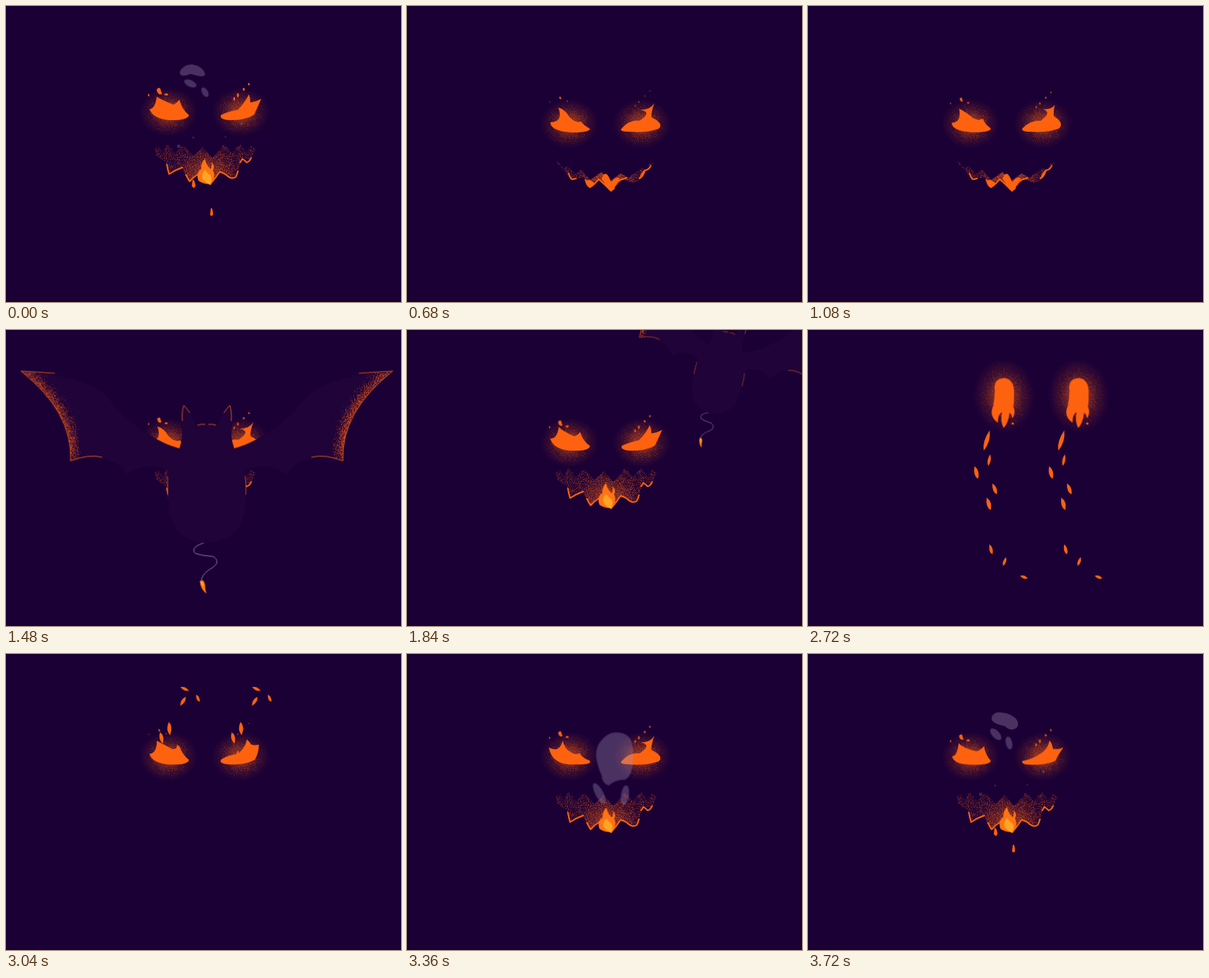
An HTML page without scripts for the animation above (3760 ms loop, 540 by 405 pixels).

```html
<!DOCTYPE html>
<html lang="en">
<head>
<meta charset="utf-8">
<title>Haunted face</title>
<style>
  html, body { margin: 0; width: 100%; height: 100%; overflow: hidden; background: #1b0036; }
  svg { display: block; width: 100vw; height: 100vh; }
  .a { animation: 3.76s linear infinite; }
  .fire { fill: #ff620f; }
  .line { fill: none; stroke: #ff620f; stroke-linecap: round; stroke-linejoin: round; }
  .grain { filter: url(#grain); }
  .smoke { fill: #a48fb8; fill-opacity: .34; }

  /* Eyes */
  .eyes { animation-name: eyes; transform-origin: 272px 150px; }
  @keyframes eyes {
    0% { transform: translateY(5px); }
    12% { transform: translateY(9px); }
    17%, 30% { transform: translateY(21px); }
    39.4%, 50% { transform: translateY(14px); }
    53%, 77% { transform: translateY(0) scaleY(0); }
    79%, 98.9% { transform: none; }
    100% { transform: translateY(5px); }
  }
  .left { animation-name: left; }
  @keyframes left {
    0%, 12%, 22%, 33%, 50%, 80%, 94%, 100% { d: path("M196 136Q204 136 206 119Q214 124 229 130Q234 127 237 123Q240 136 250 144Q249 152 222 151Q201 149 196 136Z"); }
    3%, 30%, 42%, 98.9% { d: path("M197 140Q204 140 206 122Q212 129 230 133Q236 132 241 126Q242 137 250 146Q248 152 220 151Q199 150 197 140Z"); }
    6%, 18.1%, 28%, 39.4%, 84% { d: path("M196 138Q214 138 207 118Q216 120 222 131Q231 140 238 137Q240 141 250 147Q250 152 225 152Q196 150 196 138Z"); }
    9%, 15%, 25%, 36%, 45%, 89.4% { d: path("M194 128Q209 136 213 118Q216 133 230 137Q236 137 236 135Q238 142 250 146Q253 152 230 151Q198 153 194 128Z"); }
  }
  .right { animation-name: right; }
  @keyframes right {
    0%, 12%, 22%, 33%, 50%, 80%, 94%, 100% { d: path("M294 144Q304 139 317 137Q326 128 332 116Q334 120 334 127Q342 126 349 122Q344 133 339 144Q325 152 305 151Q291 150 294 144Z"); }
    3%, 9%, 25%, 42%, 98.9% { d: path("M293 146Q305 145 318 136Q328 130 330 118Q334 122 335 130Q342 131 349 128Q342 137 338 146Q325 152 300 151Q291 150 293 146Z"); }
    6%, 18.1%, 28%, 39.4%, 84%, 89.4% { d: path("M293 147Q304 134 318 136Q336 124 319 121Q333 121 338 112Q334 124 334 131Q352 140 344 147Q325 153 305 151Q290 151 293 147Z"); }
  }
  .spark { animation: spark .47s linear infinite; transform-box: fill-box; transform-origin: center; }
  @keyframes spark {
    0%, 100% { transform: none; }
    60% { transform: translateY(-9px) scale(.2); }
    61% { transform: translateY(9px) scale(.2); }
  }

  /* Mouth */
  .mouth { animation-name: mouth; }
  @keyframes mouth { 0%, 50.5% { opacity: 1; } 53%, 81.5% { opacity: 0; } 84.5%, 100% { opacity: 1; } }
  .maw { animation-name: maw; }
  @keyframes maw {
    0%, 12.5%, 34.5%, 100% { d: path("M203 195L209 192 214 199 221 189 231 201 242 190 256 205 269 193 282 208 298 189 309 201 320 189 328 199 335 192 341 195 335 211 322 210 318 224 311 236 293 227 279 244 263 229 250 240 240 221 223 229 218 214 205 204Z"); }
    16.5%, 30.5% { d: path("M203 211L208 215 214 222 220 219 229 229 239 224 250 238 266 227 277 240 292 229 303 235 319 222 327 223 332 215 339 213 330 225 321 231 317 239 309 242 295 237 279 253 263 237 250 249 241 235 224 237 216 227 207 217Z"); }
  }
  .lip { animation-name: lip; }
  @keyframes lip {
    0%, 12.5%, 34.5%, 100% { d: path("M220 217Q221 224 223 230Q232 224 241 221M246 231Q249 237 251 240Q256 234 263 230Q271 236 279 244Q286 236 292 227Q297 228 301 231Q308 238 314 234Q316 231 317 226M320 214Q322 212 323 209Q326 211 329 214Q333 213 335 208"); }
    16.5%, 30.5% { d: path("M221 229Q222 234 225 237Q228 237 231 236M244 238Q246 246 250 248Q256 245 262 237Q268 242 279 253Q284 246 288 240Q292 237 295 237Q297 236 298 236Q299 235 300 235M318 236Q320 233 321 230Q324 226 325 225Q331 224 333 219"); }
  }
  .open { animation-name: open; }
  @keyframes open { 0%, 12.5%, 34.5%, 100% { opacity: 1; } 15%, 31% { opacity: 0; } }
  .shut { animation-name: shut; }
  @keyframes shut { 0%, 14%, 33%, 100% { opacity: 0; } 16.5%, 30.5% { opacity: 1; } }
  .lick { animation: lick .47s ease-in-out infinite; transform-origin: 277px 243px; }
  @keyframes lick { 50% { transform: skewX(-7deg) scaleY(.82); } }

  .drip1 { animation-name: drip1; }
  @keyframes drip1 {
    0% { transform: translate(281px, 281px); }
    4.2%, 19% { transform: translate(281px, 371px); visibility: hidden; }
    20% { transform: translate(279px, 252px); visibility: visible; }
    23% { transform: translate(279px, 272px); }
    27.7% { transform: translate(279px, 371px); visibility: visible; }
    27.8%, 94.6% { transform: translate(281px, 244px); visibility: hidden; }
    94.7% { transform: translate(281px, 244px); visibility: visible; }
    98.9% { transform: translate(281px, 265px); }
    100% { transform: translate(281px, 281px); visibility: visible; }
  }
  .drip2 { animation-name: drip2; }
  @keyframes drip2 {
    0%, 5% { transform: translate(256px, 243px); }
    8% { transform: translate(256px, 270px); }
    12.8% { transform: translate(256px, 371px); visibility: visible; }
    12.9%, 95% { transform: translate(256px, 238px) scale(0); visibility: hidden; }
    98% { transform: translate(256px, 243px); visibility: visible; }
    100% { transform: translate(256px, 243px); }
  }

  /* Smoke */
  .puff { animation-name: puff; transform-origin: 278px 215px; }
  @keyframes puff {
    0% { transform: none; opacity: 1; }
    7% { transform: translate(-6px, -12px); opacity: 0; }
    83.9% { transform: scale(.1); opacity: 0; }
    84% { transform: scale(.1); opacity: 1; }
    89.4%, 100% { transform: none; opacity: 1; }
  }
  .cloud { animation-name: cloud; }
  @keyframes cloud {
    0%, 8%, 100% { d: path("M255 80Q268 82 272 92Q273 97 264 96Q256 94 252 93Q246 96 240 95Q235 92 240 86Q246 79 255 80Z"); }
    80%, 89.4% { d: path("M286 107Q309 107 309 132Q311 166 298 172Q284 172 276 180Q267 178 266 166Q252 135 264 120Q273 107 286 107Z"); }
    98.9% { d: path("M264 80Q280 81 287 91Q291 102 280 104Q274 103 270 99Q262 97 258 95Q249 91 253 84Q257 79 264 80Z"); }
  }
  .wisp1 { animation-name: wisp1; }
  @keyframes wisp1 {
    0%, 8%, 100% { transform: translate(252px, 106px) rotate(-65deg) scale(.9); }
    80%, 89.4% { transform: translate(263px, 191px) rotate(-28deg) scale(1.1, 1.6); }
    98.9% { transform: translate(257px, 110px) rotate(-42deg); }
  }
  .wisp2 { animation-name: wisp2; }
  @keyframes wisp2 {
    0%, 8%, 100% { transform: translate(272px, 118px) rotate(-30deg) scale(.8); }
    80%, 89.4% { transform: translate(298px, 193px) rotate(8deg) scale(1.1, 1.5); }
    98.9% { transform: translate(275px, 122px) rotate(-12deg) scale(.9, 1); }
  }
  .bits { animation-name: bits; }
  @keyframes bits { 0%, 100% { opacity: .8; } 5%, 92% { opacity: 0; } }

  /* Bat */
  .bat { animation-name: bat; transform-origin: 275px 215px; }
  @keyframes bat {
    0%, 33% { transform: scale(.02); visibility: hidden; }
    33.1% { transform: scale(.1); visibility: visible; }
    39.4% { transform: none; }
    42% { transform: translateY(14px) scale(.95, 1.04); }
    45.7% { transform: translateY(-10px) scale(.78, .9); }
    53% { transform: translate(340px, -330px) rotate(30deg) scale(.45); visibility: visible; }
    53.1%, 100% { transform: scale(.02); visibility: hidden; }
  }

  /* Fireballs: --d is how many ms a part lags behind the head */
  .ride {
    animation: ride 3.76s linear infinite;
    animation-delay: calc(var(--d, 0) * 1ms - 3760ms);
    offset-path: path("M560 -10C520 100 480 190 432 250S370 352 310 342S243 270 243 200S262 125 267 92S235 -8 222 140");
    offset-rotate: auto 90deg;
  }
  @keyframes ride {
    0%, 54.2% { offset-distance: 0px; visibility: hidden; }
    54.3% { offset-distance: 0px; visibility: visible; }
    59.57% { offset-distance: 284px; }
    72.34% { offset-distance: 750px; }
    78.6% { offset-distance: 905px; visibility: visible; }
    78.7%, 100% { offset-distance: 905px; visibility: hidden; }
  }
  .stretch { animation-name: stretch; }
  @keyframes stretch { 0%, 59.57% { transform: scaleY(1.42); } 72.34%, 100% { transform: none; } }
  .apart { animation-name: apart; }
  @keyframes apart {
    0%, 59.57% { transform: translateX(54px); }
    72.34% { transform: translateX(102px); }
    78.7%, 100% { transform: translateX(98px); }
  }
  .ash { animation-name: ash; transform-origin: 225px 140px; }
  @keyframes ash {
    0%, 51.5% { opacity: 0; transform: translateY(12px) scale(.8); }
    53% { opacity: 1; }
    59.57% { opacity: 1; transform: none; }
    64%, 100% { opacity: 0; transform: translateY(-8px) scale(1.05); }
  }
</style>
</head>
<body>
<svg viewBox="0 0 540 405" preserveAspectRatio="none">
  <defs>
    <filter id="grain" x="-20%" y="-20%" width="140%" height="140%" color-interpolation-filters="sRGB">
      <feTurbulence type="fractalNoise" baseFrequency=".93" numOctaves="2" seed="4"/>
      <feColorMatrix values="0 0 0 0 0  0 0 0 0 0  0 0 0 0 0  2.4 0 0 0 -.7"/>
      <feComposite in2="SourceGraphic" operator="arithmetic" k2="1" k3="1" k4="-1"/>
      <feComponentTransfer result="dots"><feFuncA type="linear" slope="2.5"/></feComponentTransfer>
      <feFlood flood-color="#ff620f"/>
      <feComposite in2="dots" operator="in"/>
    </filter>
    <filter id="soft" x="-50%" y="-50%" width="200%" height="200%"><feGaussianBlur stdDeviation="8"/></filter>
    <radialGradient id="glow">
      <stop offset=".2" stop-color="#ff620f" stop-opacity=".42"/>
      <stop offset=".6" stop-color="#ff620f" stop-opacity=".14"/>
      <stop offset="1" stop-color="#ff620f" stop-opacity="0"/>
    </radialGradient>
    <radialGradient id="dust">
      <stop offset=".4" stop-color="#ff620f" stop-opacity=".65"/>
      <stop offset="1" stop-color="#ff620f" stop-opacity="0"/>
    </radialGradient>
    <radialGradient id="heat" gradientUnits="userSpaceOnUse" cx="277" cy="238" r="80">
      <stop offset="0" stop-color="#ff620f" stop-opacity=".7"/>
      <stop offset=".5" stop-color="#ff620f" stop-opacity=".45"/>
      <stop offset="1" stop-color="#ff620f" stop-opacity=".36"/>
    </radialGradient>
    <radialGradient id="warm" gradientUnits="userSpaceOnUse" cx="275" cy="235" r="42">
      <stop offset="0" stop-color="#ff620f" stop-opacity=".5"/>
      <stop offset="1" stop-color="#ff620f" stop-opacity=".06"/>
    </radialGradient>
    <path id="half" d="M276 129Q267 127 260 131Q255 114 243 103Q239 120 240 132Q243 145 237 162C195 150 155 115 140 92C110 63 60 60 20 56Q91 112 88 179Q145 165 165 198Q190 180 221 192V235Q223 290 276 292Z"/>
    <clipPath id="wing"><use href="#half"/></clipPath>
    <g id="side">
      <use href="#half" fill="#1f0339"/>
      <g clip-path="url(#wing)">
        <g class="grain" opacity=".7"><path d="M20 56Q91 112 88 179" fill="none" stroke="#fff" stroke-width="20" filter="url(#soft)"/></g>
      </g>
      <path class="line" stroke-width="1" d="M66 59Q40 57 20 56Q91 112 88 179Q114 169 131 174M241 124Q240 112 243 103Q248 108 251 113M262 130Q268 128 272 129" opacity=".85"/>
    </g>
    <g id="halo">
      <ellipse rx="40" ry="34" fill="url(#glow)"/>
      <ellipse rx="38" ry="33" fill="url(#dust)" class="grain" opacity=".3"/>
    </g>
    <path id="ember" class="fire" d="M1 -9Q6 0 -1 9Q-6 2 1 -9Z"/>
    <use id="e1" href="#ember" transform="translate(-3) scale(1 1.6)"/>
    <use id="e2" href="#ember" transform="translate(4) scale(.7 .9)"/>
    <use id="e3" href="#ember" transform="translate(-13) rotate(-22)"/>
    <use id="e4" href="#ember" transform="translate(12) rotate(-28) scale(.9)"/>
    <use id="e5" href="#ember" transform="translate(3) rotate(-20)"/>
    <use id="e6" href="#ember" transform="translate(-6) scale(.8)"/>
    <use id="e7" href="#ember" transform="translate(2) rotate(50) scale(.7)"/>
    <use id="e8" href="#ember" transform="rotate(-10) scale(.7 .6)"/>
    <g id="ball">
      <use href="#halo" transform="translate(0 10) scale(1.05 1.5)"/>
      <path class="fire" d="M-12 2Q-13 -14 2 -14Q15 -12 14 6Q13 18 11 26Q14 36 8 42Q8 36 5 34Q2 48 -5 54Q-9 44 -5 32Q-11 34 -12 46Q-24 36 -16 22Q-13 12 -12 2Z"/>
      <circle class="fire" cx="8" cy="49" r="1.6"/>
    </g>
  </defs>

  <rect width="540" height="405" fill="#1b0036"/>

  <g class="a eyes">
    <use href="#halo" x="222" y="140"/>
    <use href="#halo" x="321" y="140"/>
    <path class="a fire left"/>
    <path class="a fire right"/>
    <g class="fire">
      <path class="spark" d="M206 109Q211 104 212 112Q215 116 210 116Q206 114 206 109Z"/>
      <ellipse class="spark" cx="195" cy="117" rx="1" ry="1.8"/>
      <ellipse class="spark" cx="219" cy="116" rx="2.6" ry="1.6"/>
      <ellipse class="spark" cx="312" cy="122" rx="1.3" ry="2.4"/>
      <ellipse class="spark" cx="317" cy="117" rx="1.4" ry="3"/>
      <ellipse class="spark" cx="325" cy="109" rx="1.4" ry="2"/>
      <ellipse class="spark" cx="332" cy="102" rx="1.2" ry="1.8"/>
    </g>
  </g>

  <g class="a mouth">
    <g opacity=".5"><path class="a maw grain" fill="url(#heat)"/></g>
    <path class="a maw" fill="url(#warm)"/>
    <path class="a fire shut" d="M266 236Q272 221 279 241Q287 232 291 236Q284 243 284 250Q279 256 274 249Q270 242 266 236ZM245 239Q250 236 257 243Q251 251 246 245ZM318 237Q322 224 326 225Q324 234 318 237Z"/>
    <path class="a line lip" stroke-width="2"/>
    <g class="a open">
      <g class="lick">
        <path fill="#ff7412" d="M263 239Q259 228 267 223Q266 215 272 209Q274 219 280 223Q282 219 281 214Q286 218 283 225Q288 236 278 244Q268 243 263 239Z"/>
        <path fill="#ffa526" d="M269 237Q266 231 272 224Q276 230 279 231Q283 237 279 244Q273 242 269 237Z"/>
      </g>
    </g>
  </g>

  <g class="fire">
    <path class="a drip1" d="M-1 -5Q2 -6 2 4Q0 7 -2 4Z"/>
    <path class="a drip2" d="M-1 -5Q2 -6 3 3Q1 9 -2 3Z"/>
  </g>

  <g class="a puff smoke">
    <path class="a cloud"/>
    <ellipse class="a wisp1" rx="5" ry="10"/>
    <ellipse class="a wisp2" rx="5" ry="9"/>
  </g>
  <g class="a bits smoke">
    <circle cx="236" cy="192" r="2.4"/><circle cx="256" cy="180" r="1.3"/>
    <circle cx="300" cy="179" r="1"/><circle cx="322" cy="161" r="2"/>
  </g>

  <g class="a bat">
    <path d="M275 290Q250 297 259 306Q268 309 283 310Q296 318 278 328Q266 336 267 346" fill="none" stroke="#8f7ba0"/>
    <path fill="#ff7a14" d="M265 344Q270 340 272 348Q272 355 274 361Q266 355 265 344Z"/>
    <path fill="#ffa526" d="M266 344Q270 343 270 351Q266 349 266 344Z"/>
    <use href="#side"/>
    <use href="#side" transform="translate(549) scale(-1 1)"/>
    <path class="line" stroke-width="1" d="M221 201V224M327 200Q329 212 328 225" opacity=".7"/>
  </g>

  <g class="a ash fire">
    <circle cx="209.500" cy="128.500" r="2.200"/><circle cx="215" cy="130" r="1.100"/>
    <circle cx="234" cy="127.500" r="1.400"/><circle cx="239" cy="138" r="1"/>
    <ellipse cx="231" cy="145" rx="1.600" ry="2.400"/><circle cx="244" cy="142" r="1.100"/>
    <circle cx="318" cy="117.500" r="1"/><circle cx="329" cy="176" r="1.100"/>
  </g>

  <g>
    <g class="ride"><g class="a stretch"><use href="#ball"/></g></g>
    <g class="ride" style="--d:78"><use href="#e1"/></g>
    <g class="ride" style="--d:105"><use href="#e2"/></g>
    <g class="ride" style="--d:123"><use href="#e3"/></g>
    <g class="ride" style="--d:146"><use href="#e4"/></g>
    <g class="ride" style="--d:167"><use href="#e5"/></g>
    <g class="ride" style="--d:230"><use href="#e6"/></g>
    <g class="ride" style="--d:254"><use href="#e7"/></g>
    <g class="ride" style="--d:290"><use href="#e8"/></g>
  </g>
  <g class="a apart">
    <g class="ride"><g class="a stretch"><use href="#ball"/></g></g>
    <g class="ride" style="--d:78"><use href="#e1"/></g>
    <g class="ride" style="--d:105"><use href="#e2"/></g>
    <g class="ride" style="--d:123"><use href="#e3"/></g>
    <g class="ride" style="--d:146"><use href="#e4"/></g>
    <g class="ride" style="--d:167"><use href="#e5"/></g>
    <g class="ride" style="--d:230"><use href="#e6"/></g>
    <g class="ride" style="--d:254"><use href="#e7"/></g>
    <g class="ride" style="--d:290"><use href="#e8"/></g>
  </g>
</svg>
</body>
</html>
```
